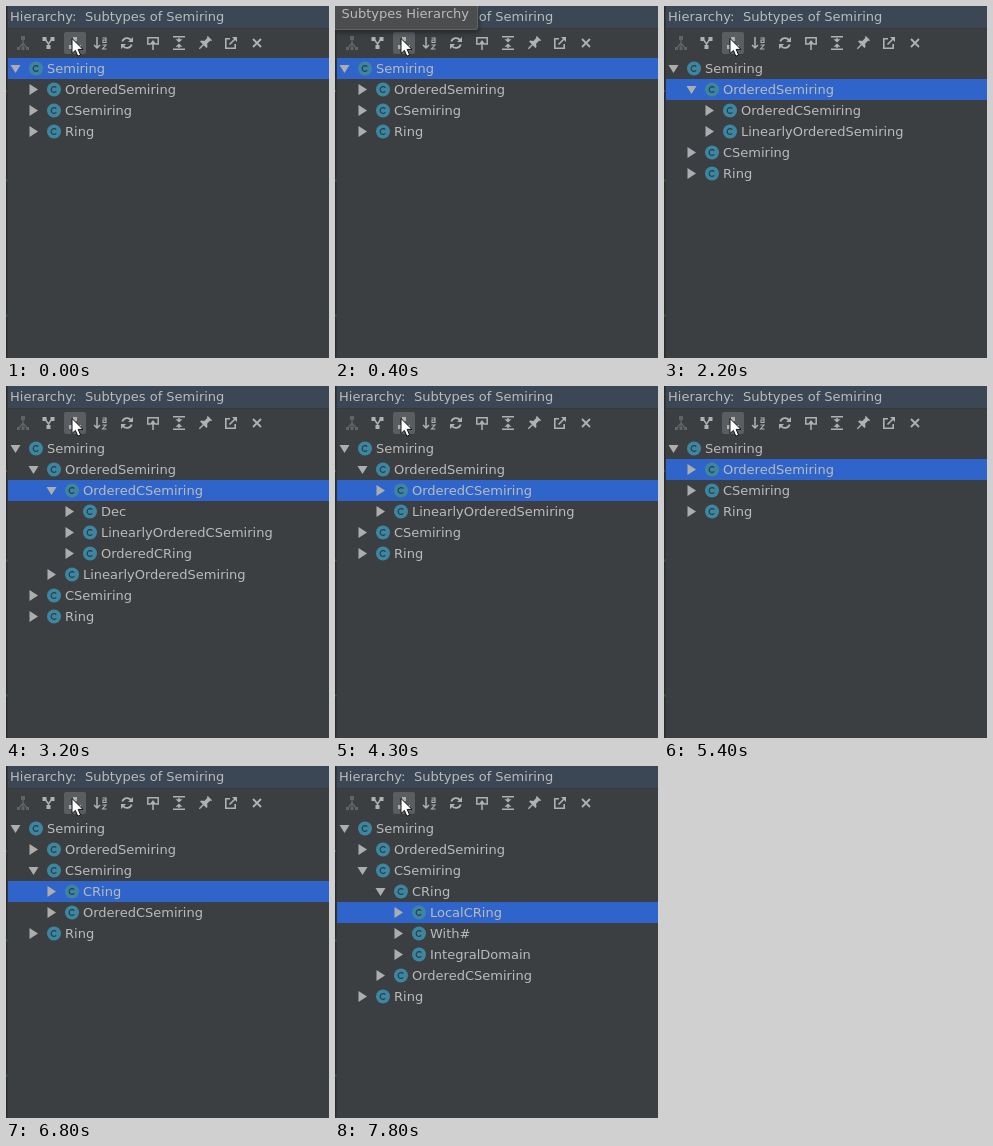
These frames come from a looping animation (323x352 px, 8 s). An HTML page:

```html
<!DOCTYPE html>
<html lang="en">
<head>
<meta charset="utf-8">
<title>Type hierarchy</title>
<style>
  html, body { margin: 0; width: 100%; height: 100%; overflow: hidden; background: #3c3f41; }
  svg { display: block; }
  text { font: 13px "DejaVu Sans", sans-serif; fill: #bbb; white-space: pre; }
  .icons { fill: none; stroke: #afb1b3; stroke-width: 1.8; }
  .icons .solid { fill: #afb1b3; stroke: none; }
  .icons .dim { stroke: #616466; }
  .icons .dim .solid { fill: #616466; }
  .arrow { fill: #adadad; }
  .badge { fill: #3e86a0; }
  .on .badge { fill: #3b9bd8; }
  .letter { fill: none; stroke: #233f4c; stroke-width: 1.2; }
  #tip { animation: tip 8s step-end infinite; }
  @keyframes tip {
    0% { opacity: 0; }
    3.75% { opacity: .5; }
    5% { opacity: 1; }
    22.5% { opacity: .8; }
    23.75%, 100% { opacity: 0; }
  }
</style>
</head>
<body>
<svg width="323" height="352" viewBox="0 0 323 352">
  <defs>
    <filter id="shade" x="-10%" y="-20%" width="120%" height="170%">
      <feDropShadow dx="1" dy="3" stdDeviation="2" flood-color="#000" flood-opacity=".35"/>
    </filter>
    <path id="down" d="M-5-3.5H5L0 4.5Z"/>
    <path id="right" d="M-4-5.5V5.5L4.5 0Z"/>
    <g id="type">
      <circle class="badge" r="7"/>
      <path class="letter" d="M2.3-1.9A2.9 2.9 0 1 0 2.3 1.9"/>
    </g>
  </defs>

  <rect width="323" height="352" fill="#3c3f41"/>
  <rect width="323" height="22" fill="#3b4754"/>
  <rect y="22" width="323" height="1" fill="#35393c"/>
  <text x="4" y="15">Hierarchy:</text>
  <text x="79" y="15">Subtypes of Semiring</text>

  <rect x="58" y="26" width="22" height="22" rx="2" fill="#5a5e60"/>
  <g class="icons">
    <g class="dim" transform="translate(17 37)">
      <path d="M0-4V1M0 0L-4 5M0 0L4 5M0 0V6" stroke-width="1.3"/>
      <path class="solid" d="M-2-7H2V-3H-2ZM-6 4H-3V7H-6ZM3 4H6V7H3ZM-1.5 4H1.5V7H-1.5Z"/>
    </g>
    <g transform="translate(42.5 37)">
      <path d="M-3.5-4L0 1L3.5-4M0 0V4" stroke-width="1.4"/>
      <path class="solid" d="M-6-6H-2V-2H-6ZM2-6H6V-2H2ZM-2 2H2V6H-2Z"/>
    </g>
    <g transform="translate(69 37)">
      <path d="M-3.5 4L0-1L3.5 4M0 0V-4" stroke-width="1.4"/>
      <path class="solid" d="M-2-6H2V-2H-2ZM-6 2H-2V6H-6ZM2 2H6V6H2Z"/>
    </g>
    <g transform="translate(95 37)">
      <path d="M-4-6V5M-7 2L-4 5L-1 2" stroke-width="1.5"/>
      <path d="M1.5-5H5V-.5H2V-3H5M1.5 2H5L1.5 6H5.5" stroke-width="1.1"/>
    </g>
    <g transform="translate(121 37)">
      <path d="M-4.7-1.5A5 5 0 0 1 4-3M4.7 1.5A5 5 0 0 1-4 3"/>
      <path class="solid" d="M6-6V-1H1ZM-6 6V1H-1Z"/>
    </g>
    <g transform="translate(147 37)">
      <path d="M-2.5 1H-5.2V-5.2H5.2V1H2.5M0 7V-1" stroke-width="1.5"/>
      <path class="solid" d="M0-3L3.5 1.5H-3.5Z"/>
    </g>
    <g transform="translate(173 37)">
      <path d="M-6-6.2H6M-6 6.2H6M0-5V-2M0 5V2" stroke-width="1.5"/>
      <path class="solid" d="M-3.5-3.8H3.5L0-.4ZM-3.5 3.8H3.5L0 .4Z"/>
    </g>
    <g transform="translate(199 37) rotate(45)">
      <path class="solid" d="M-3-7H3V-5.5H2V-1L4.5 1V2.5H-4.5V1L-2-1V-5.5H-3Z"/>
      <path d="M0 2V8" stroke-width="1.4"/>
    </g>
    <g transform="translate(225 37)">
      <path d="M-1-4.2H-5.2V5.2H4.2V1M-1.5 1.5L4-4" stroke-width="1.6"/>
      <path class="solid" d="M1-6H6V-1Z"/>
    </g>
    <path d="M247 33L255 41M255 33L247 41"/>
  </g>

  <g id="tree"></g>

  <rect width="1" height="352" fill="#2b2b2b"/>
  <rect x="1" width="1" height="352" fill="#333537"/>
  <path d="M0 85H1M0 174.5H2M0 309.5H2" stroke="#28602c" stroke-width="2"/>

  <g id="tip">
    <path d="M0 0H143V21Q143 24 140 24H0Z" fill="#4b4d4f" filter="url(#shade)"/>
    <path d="M142.5 0V21Q142.5 23.5 140 23.5H0" fill="none" stroke="#606365"/>
    <text x="6.5" y="12">Subtypes Hierarchy</text>
  </g>
  <path d="M66 32.5V47.5L69.4 44.4L71.8 50.2L74.6 49L72.2 43.4H77Z"
        fill="#fff" stroke="#111" stroke-linejoin="round"/>
</svg>
<script>
  const LOOP = 8000, ROW = 21, TOP = 52, INDENT = 18;
  const node = (name, ...kids) => ({ name, kids });
  const root = node("Semiring",
    node("OrderedSemiring",
      node("OrderedCSemiring", node("Dec"), node("LinearlyOrderedCSemiring"), node("OrderedCRing")),
      node("LinearlyOrderedSemiring")),
    node("CSemiring",
      node("CRing", node("LocalCRing"), node("With#"), node("IntegralDomain")),
      node("OrderedCSemiring")),
    node("Ring"));

  // Selecting moves the highlight; toggling opens or closes the selected row.
  const steps = [
    [1800, "OrderedSemiring"], [2200], [2800, "OrderedCSemiring"], [3200],
    [4300], [4800, "OrderedSemiring"], [5400], [5900, "CSemiring"],
    [6400], [6800, "CRing"], [7200], [7800, "LocalCRing"]
  ];
  const tree = document.getElementById("tree");
  const start = performance.now();
  let shown = -1;

  function stateAfter(count) {
    const open = new Set(["Semiring"]);
    let selected = "Semiring";
    for (const [, name] of steps.slice(0, count)) {
      if (name) selected = name;
      else if (!open.delete(selected)) open.add(selected);
    }
    return { open, selected };
  }

  function drawTree({ open, selected }) {
    let row = 0, out = "";
    const visit = ({ name, kids }, level) => {
      const y = TOP + ROW * row++, x = INDENT * level;
      // The same type also sits closed and unselected under CSemiring.
      const isOpen = open.has(name), on = name === selected;
      if (on) out += `<rect x="2" y="${y}" width="321" height="${ROW}" fill="#2f65ca"/>`;
      out += `<g class="${on ? "on" : ""}" transform="translate(${x} ${y})">
        <use class="arrow" href="#${isOpen ? "down" : "right"}" x="${isOpen ? 9.5 : 9.5}" y="10.5"/>
        <use href="#type" x="30" y="10.5"/><text x="41" y="15">${name}</text></g>`;
      if (isOpen) kids.forEach(kid => visit(kid, level + 1));
    };
    visit(root, 0);
    tree.innerHTML = out;
  }

  function frame(now) {
    const t = Math.max(0, now - start) % LOOP;
    const count = steps.filter(([at]) => at <= t).length;
    if (count !== shown) drawTree(stateAfter(shown = count));
    requestAnimationFrame(frame);
  }
  frame(start);
</script>
</body>
</html>
```
